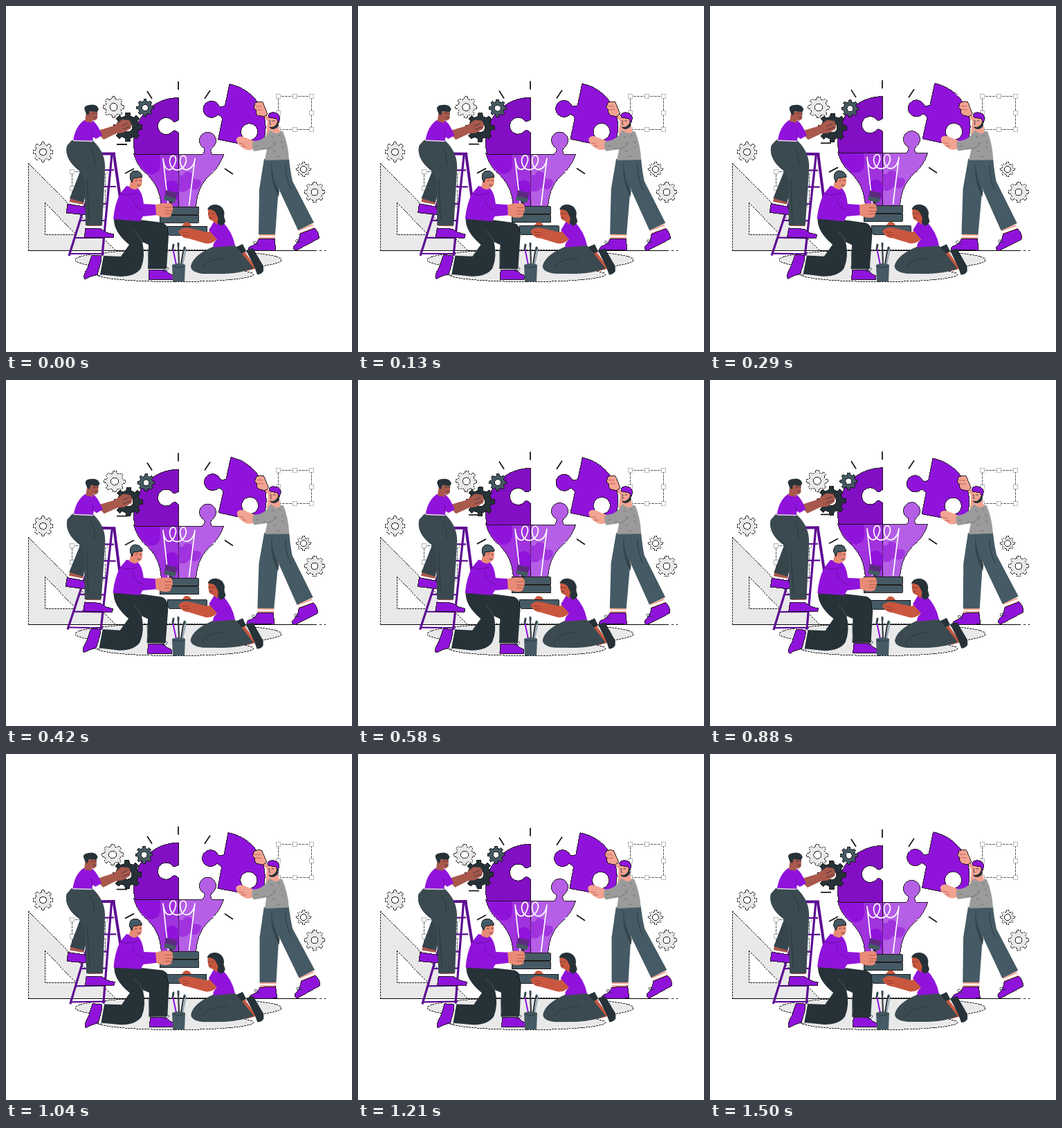
An HTML page for the animation above (1.54 s loop, 500 by 500 pixels).

```html
<!DOCTYPE html>
<html lang="en">
<head>
<meta charset="utf-8">
<title>Building an idea</title>
<style>
html, body { margin: 0; width: 100%; height: 100%; overflow: hidden; background: #fff; }
svg { display: block; width: 100vw; height: 100vh; }
.p { fill: #9013db; } .pd { fill: #820fc3; } .pm { fill: #a033dd; } .pl { fill: #b55ee6; }
.g { fill: #455a64; } .d { fill: #263238; } .m { fill: #36454c; } .k { fill: #3b4a51; }
.l { fill: #e9e9e9; } .w { fill: #fff; }
.s1 { fill: #a9584c; } .s2 { fill: #e88b76; } .s3 { fill: #c9573f; } .s4 { fill: #f3a391; }
.o { stroke: #111; stroke-width: .9; shape-rendering: crispEdges; }
.l.o { stroke-dasharray: 3 1; }
.n { fill: none; stroke: #263238; stroke-width: .8; stroke-linecap: round; stroke-linejoin: round; }
.ray { fill: none; stroke: #1a1a1a; stroke-width: 1.8; }
.floor { stroke: #000; shape-rendering: crispEdges; }
.lad { fill: none; stroke: #5d0d92; stroke-width: 3.2; }
</style>
</head>
<body>
<svg viewBox="0 0 500 500">
  <!-- backdrop -->
  <path class="l o" fill-rule="evenodd" d="M32.5 227V353H158ZM56 284L101 330H56Z"/>
  <ellipse class="l o" cx="249" cy="367" rx="149" ry="15"/>
  <ellipse class="l o" cx="245" cy="388" rx="113" ry="10.5"/>
  <path class="l" d="M145 377H345V388H145Z"/>
  <path class="floor" d="M32 353.500H449M453 353.500H456M460 353.500H462"/>
  <g id="back"></g>

  <g id="bulb">
    <path class="ray" d="M249 109V121M204 123L211 134M295 122L287 134M160 200H175M316 235L328 243M172 242L185 235"/>
    <g transform="translate(249.5 214.5)">
      <path class="pm o" d="M-65 -2H0V76H-25C-27 52 -34 40 -48 27C-56 20 -62 10 -65 -2Z"/>
      <path class="pl o" d="M0 0H34Q39 -5 37 -9A12 12 0 1 1 47 -9Q45 -5 48 0H65C62 10 56 20 48 27C34 40 27 52 25 76H0Z"/>
      <path class="p" d="M-64 0H-28Q-24 15 -29 24Q-38 32 -46 26Q-60 14 -64 0ZM-20 46A10 10 0 1 1 0 50V66H-19Z"/>
      <path class="pm" d="M0 28Q6 34 9 25Q22 24 22 36Q36 34 31 46Q24 55 16 48Q8 58 0 52Z"/>
      <path class="pd o" d="M0 0V-31Q-5 -36 -8 -34.500A12 12 0 1 1 -8 -47.500Q-5 -46 0 -50V-82C-36 -82 -65 -54 -65 -18Q-65 -8 -63 0Z"/>
      <path d="M-15 74L-22.500 6C-20 28 -8 26 -4 9C-3 -1 -12 0 -13 9C-12 28 8 26 11 9C11 -1 2 0 2 9C3 28 21 26 23.500 6L15 74" fill="none" stroke="#fff" stroke-width="1.7" stroke-linejoin="round"/>
    </g>
    <path class="g o" d="M222 290H278V301H222Z"/>
    <path class="g o" d="M222 302H278V313H222Z"/>
  </g>

  <g id="climber">
    <g class="lad">
      <path d="M156 215L166 284" stroke-width="4"/>
      <path d="M137 214L91 361M153 214L139 361"/>
      <path d="M92 358H142M99 335H142M107 310H144M114 286H147M122 261H159M130 237H156" stroke-width="2.200"/>
      <path d="M132 213.500H158" stroke-width="4"/>
    </g>
    <g id="cogs"></g>
    <path class="s1" d="M93 277L113 282L111 289L91 286Z"/>
    <path class="w" d="M91 283L112 287V291L90 288Z"/>
    <path class="p o" d="M89 286L113 290Q117 296 117 302L87 299Z"/>
    <path class="m" d="M90 200L120 200L127 230L112 284L92 278L107 239Q84 222 88 203Z"/>
    <path class="s1" d="M117 314H138V320H117Z"/>
    <path class="w" d="M116 318H138V322H116Z"/>
    <path class="p o" d="M115 321L137 322Q146 329 156 330L155 335L113 334Z"/>
    <path class="k" d="M95 194H125Q145 212 143 238L139 317H115L113 249L103 231Q84 220 88 202Z"/>
    <path class="n" d="M122 205Q129 215 128 230M117 250L120 308"/>
    <path class="s1" d="M130 181L156 173L168 164L178 165Q183 171 180 177L170 183L160 184L141 193Z"/>
    <path class="n" d="M168 173L176 169M169 178L179 174"/>
    <path class="p" d="M113 165L126 166Q133 172 139 187L130 192L126 189L125 196L97 195Q100 174 113 165Z"/>
    <path class="n" d="M124 180L126 190" style="stroke:#5d0d92"/>
    <path d="M97 194.500L125 195.500" stroke="#ddd" stroke-width="1.500"/>
    <path class="s1" d="M116 153L132 151L132 162Q129 167 124 165L125 169L114 167Z"/>
    <path class="d" d="M114 151Q111 144 121 143Q131 141 134 149L132 153L121 152L119 158L116 156Z"/>
    <path class="n" d="M125 155H128M130 155H132M127 161H131"/>
  </g>

  <g id="placer">
    <path class="s4" d="M374 154L381 162L385 184L376 186L378 166L371 160Z"/>
    <g transform="translate(306.500 193) rotate(11.500)">
      <path class="p o" d="M0 0V-31Q-5 -36 -8 -34.500A12 12 0 1 1 -8 -47.500Q-5 -46 0 -50V-82C36 -82 65 -54 65 -18Q65 -8 63 0H48Q45 -5 47 -9A12 12 0 1 0 37 -9Q39 -5 34 0Z"/>
    </g>
    <path class="s4 o" d="M360 140Q366 137 371 139L378 156L373 160L364 158Q360 155 361 150L358 147Z"/>
    <path class="n" d="M361 145H369M362 150H370" style="stroke:#b55b52"/>
    <path class="s4" d="M366 329H389V337H365Z"/>
    <path class="w" d="M365 332H389V334H365Z"/>
    <path class="p o" d="M365 337L388 336L390 353H350Q349 348 357 346Q364 342 365 337Z"/>
    <path class="s4" d="M422 323L443 315L446 321L425 329Z"/>
    <path class="w" d="M423 325L444 317L445 320L424 328Z"/>
    <path class="p o" d="M425 329L446 321Q453 328 452 336L420 353Q414 353 416 347Q424 340 425 329Z"/>
    <path class="n" d="M363 342Q356 337 358 343L365 345M424 339Q417 335 419 341L427 341"/>
    <path class="g" d="M373 221H396L394 262L389 330H365L366 265Z"/>
    <path class="g" d="M378 221H409Q411 240 414 253L445 313L422 324L395 266Z"/>
    <path class="m" d="M384 224Q384 250 395 267L394 276Q380 252 384 224Z"/>
    <path class="n" d="M404 230Q404 250 412 265"/>
    <path class="s4" d="M333 192Q336 187 343 189L358 195L357 207Q347 211 340 203Q333 200 333 192Z"/>
    <path class="n" d="M337 198L344 200M340 203L347 203" style="stroke:#b55b52"/>
    <path d="M381 180L400 181Q408 200 409 222L374 223L377 207L358 210Q354 203 357 195Q372 196 381 180Z" fill="#9b9b9b"/>
    <path class="n" d="M377 207Q386 205 390 197" style="stroke:#666"/>
    <path d="M383 188l4 2m6-4l4 2m-11 10l4 2m7-5l4 3m-16 11l5 1m8-7l4 3m-11 11l5 1m-36-15l5-1m5 4l5-1" stroke="#838383" stroke-width="1.500"/>
    <path class="s4" d="M380 160L394 159L394 174L396 182Q390 187 384 181L379 176Z"/>
    <path class="d" d="M380 174Q387 177 391 170L393 165L394 173Q389 180 382 177Z"/>
    <path class="p o" d="M379 158Q380 153 388 154Q395 155 396 162L394 169L391 163L380 161Z"/>
    <path class="n" d="M380 166H382M385 166H388M382 167L381 171H383"/>
  </g>

  <g id="kneeler">
    <path class="w" d="M122 359L142 363L137 389L133 388Z"/>
    <path class="p o" d="M124 360L137 361Q139 364 136 374L132 388Q122 390 114 395Q110 391 118 378Z"/>
    <path class="w" d="M206 377H232V382H206Z"/>
    <path class="p o" d="M207 381H230Q234 387 241 389V395H206Z"/>
    <path class="n" d="M227 383Q231 374 235 379Q231 385 227 383M129 387Q133 393 138 388"/>
    <path class="d" d="M156 307L194 309L226 313Q236 317 235 332L232 380H205L206 345L197 341Q202 362 195 379Q187 391 165 391L136 388L141 361L166 362L178 345Q155 326 156 307Z"/>
    <path class="n" d="M185 325Q194 333 197 342M205 352L206 374" style="stroke:#55656d"/>
    <path class="p" d="M174 260L190 263Q197 268 199 286L217 287L218 302L198 304L194 311L155 308Q157 286 165 271Z"/>
    <path class="n" d="M183 278Q184 290 198 295M165 271Q176 276 190 270" style="stroke:#5d0d92"/>
    <path class="s2" d="M181 248L196 246Q199 262 190 263Q188 268 178 262Z"/>
    <path class="g o" d="M179 249Q178 239 186 238Q195 238 197 247L184 249L182 255Z"/>
    <path class="n" d="M187 252H189M193 252H195M190 259H194"/>
    <path class="d" d="M238 274L242 275L239 291H235Z"/>
    <path d="M231 266L248 270L245 280L229 276Z" fill="#5d2a80"/>
    <path class="g" d="M230 274L246 278L244 284L228 280Z"/>
    <path class="s2" d="M216 287L226 285L238 285Q242 288 241 295L238 304Q229 308 217 302Z"/>
    <path class="n" d="M230 291H240M230 296H240M230 300H238" style="stroke:#a3503f"/>
  </g>

  <g id="helper">
    <path class="s3" d="M254 318L258 313Q265 311 268 318L266 322H254Z"/>
    <path class="g o" d="M233 318H290V331H236Q233 330 233 318Z"/>
    <path class="s3" d="M331 354L341 350L352 365L362 379L348 383Z"/>
    <path class="d" d="M331 349L342 344L347 354L340 358ZM347 353L357 350L372 376V383Q369 388 363 388L359 377Z"/>
    <path class="k" d="M301 347L331 346L343 360L358 379Q340 386 315 387H285Q267 385 267 376Q270 360 301 347Z"/>
    <path class="n" d="M283 379Q290 365 320 364"/>
    <path class="s3" d="M249 326Q255 319 265 321L291 327L298 324L308 334Q299 345 288 343L264 336Q254 336 249 326Z"/>
    <path class="n" d="M254 327L263 328M256 332L265 331" style="stroke:#8c3527"/>
    <path class="p" d="M302 309L313 312Q327 326 331 346L300 349Q297 345 305 337L293 324Z"/>
    <path class="d" d="M296 290Q303 284 311 290Q317 296 315 304L317 311Q315 318 309 317L299 304Z"/>
    <path class="s3" d="M292 293L303 291L307 305L305 316L298 310Q291 310 292 293Z"/>
    <path class="d" d="M291 294Q294 286 304 287L312 293L308 309L303 299Q301 294 291 294Z"/>
    <path class="n" d="M293 300H295M298 300H300M294 306H297"/>
  </g>

  <g fill="none" stroke-width="2" stroke-linecap="round">
    <path d="M246 374L241 350" stroke="#9013db"/>
    <path d="M250 374L249 346M253 374L256 355" stroke="#263238"/>
    <path d="M255 374L260 350" stroke="#90a4ae"/>
    <path d="M241 351L242 345M249 347V343M257 353L258 349" stroke="#37474f" stroke-width="3"/>
  </g>
  <path class="g" d="M240 374Q250 370 259 374L258 398H241Z"/>
  <path class="n" d="M241 376Q250 379 258 376"/>
</svg>
<script>
const LOOP = 1540;
const $ = id => document.getElementById(id);

function gear(x, y, r, hole, cls) {
  const teeth = 8, pts = [];
  for (let i = 0; i < teeth; i++) {
    [[-.27, .78], [-.19, 1], [.19, 1], [.27, .78]].forEach(([a, k]) => {
      const t = (i + a) / teeth * 2 * Math.PI;
      pts.push((x + r * k * Math.sin(t)).toFixed(2) + ' ' + (y - r * k * Math.cos(t)).toFixed(2));
    });
  }
  return `<path class="${cls} o" d="M${pts.join('L')}Z"/><circle class="w o" cx="${x}" cy="${y}" r="${hole}"/>`;
}

function frame(x, y, size) {
  let out = `<rect class="n" stroke-dasharray="3 2" x="${x}" y="${y}" width="${size}" height="${size}"/>`;
  for (let i = 0; i < 9; i++) {
    if (i === 4) continue;
    const hx = x + i % 3 * size / 2, hy = y + Math.floor(i / 3) * size / 2;
    out += `<rect x="${hx - 3}" y="${hy - 3}" width="6" height="6" fill="#fff" stroke="#999" stroke-width=".7"/>`;
  }
  return out;
}

$('back').innerHTML = frame(393.5, 130.5, 48) + frame(95.5, 239.5, 48) +
  gear(53.5, 211, 14.5, 5, 'l') + gear(430, 236, 10.5, 4.5, 'l') + gear(446, 269, 15, 5, 'l');
$('cogs').innerHTML = gear(155.5, 146, 15.5, 5.5, 'l') +
  gear(201, 147, 12.5, 4.5, 'g') + gear(176, 175, 21, 7, 'd');

// id, swing in degrees, pivot
const swings = [
  ['climber', .95, 120, 240],
  ['placer', 1, 385, 235],
  ['kneeler', .75, 190, 270],
  ['helper', .6, 310, 345]
];

function draw(now) {
  const a = now % LOOP / LOOP * 2 * Math.PI;
  const lift = 3 * (Math.cos(a) - 1);
  $('bulb').setAttribute('transform', `translate(0 ${lift})`);
  for (const [id, deg, x, y] of swings)
    $(id).setAttribute('transform', `rotate(${deg * Math.sin(a)} ${x} ${y})`);
}

let start;
function tick(now) {
  start ??= now;
  draw(now - start);
  requestAnimationFrame(tick);
}
draw(0);
requestAnimationFrame(tick);
</script>
</body>
</html>
```
